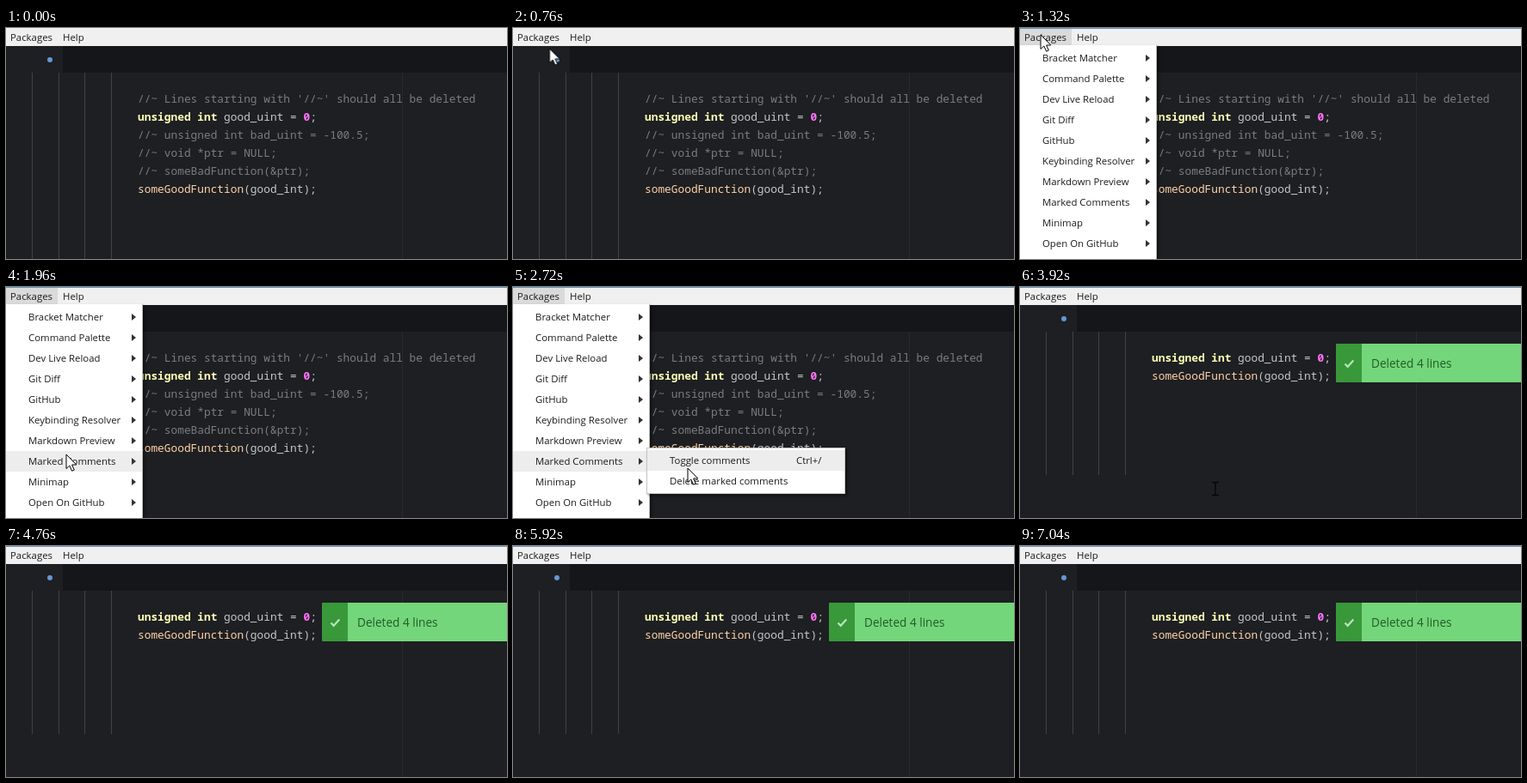
These frames come from a looping animation (582 px wide and 269 px high, 7.08 s). An HTML page:

```html
<!DOCTYPE html>
<html lang="en">
<head>
<meta charset="utf-8">
<title>Delete marked comments</title>
<style>
  :root { --loop: 7.08s; }
  html, body { margin: 0; width: 100%; height: 100%; overflow: hidden; background: #1d1f22; }
  #stage {
    position: relative; width: 582px; height: 269px; overflow: hidden;
    background: #1d1f22; color: #1c1c1c;
    font: 11.4px/24px "Open Sans", "Noto Sans", sans-serif;
  }
  #stage div, #stage svg, pre { position: absolute; }
  .bar, .menu, .note { white-space: nowrap; }

  /* window chrome */
  .bar { left: 0; top: 0; width: 582px; height: 21px; background: #f0f0f0; line-height: 20px; }
  .bar span { position: absolute; top: 1px; }
  .edge { left: 0; top: 0; width: 582px; height: 1px; background: #5d93b5; animation: edge var(--loop) step-end infinite; }
  .open { left: 0; top: 1px; width: 60px; height: 19px; background: #dadada; animation: open var(--loop) step-end infinite; }
  .tabs { left: 0; top: 20px; width: 582px; height: 32px; background: #151619; }
  .tab { left: 0; top: 0; width: 66px; height: 32px; background: #1d1f22; }
  .dot { left: 48px; top: 13.5px; width: 6px; height: 6px; border-radius: 50%; background: #6597d8; }

  /* editor */
  pre {
    margin: 0; left: 153px; top: 72px; color: #c5c8c6;
    font: 12.83px/21px "Noto Sans Mono", "Liberation Mono", monospace;
  }
  .c { color: #7c7c7c; }
  .k { color: #ffffb6; font-weight: 600; }
  .n { color: #ff73fd; font-weight: 600; }
  .f { color: #ffd2a7; }
  .guides {
    left: 30px; top: 52px; width: 93px; height: 251px;
    background:
      linear-gradient(#404244, #404244) 0 0 / 1px 100% no-repeat,
      linear-gradient(#404244, #404244) 31px 0 / 1px 100% no-repeat,
      linear-gradient(#404244, #404244) 61px 0 / 1px 100% no-repeat,
      linear-gradient(#404244, #404244) 92px 0 / 1px 100% no-repeat;
    animation: guides var(--loop) step-end infinite;
  }
  .wrap { left: 460px; top: 52px; width: 1px; height: 217px; background: #27292c; }
  .before { animation: before var(--loop) step-end infinite; }
  .after { animation: after var(--loop) step-end infinite; }

  /* menus */
  .menu { background: #fff; box-sizing: border-box; box-shadow: 2px 2px 3px rgba(0, 0, 0, .45); }
  .main { left: 0; top: 20px; width: 159px; height: 260px; border-right: 1px solid #bbb; animation: main var(--loop) step-end infinite; }
  .sub { left: 155px; top: 187px; width: 231px; height: 54px; border: 1px solid #c4c4c4; animation: sub var(--loop) step-end infinite; }
  .item { left: 0; width: 158px; height: 24px; text-indent: 26px; }
  .main .item::after {
    content: ""; position: absolute; left: 146px; top: 8px;
    border: 4px solid transparent; border-left: 5px solid #333; border-right: 0;
  }
  .hover { left: 0; height: 24px; background: #ededed; }
  .main .hover { top: 3px; width: 158px; animation: rows var(--loop) step-end infinite; }
  .sub .hover { top: 2px; width: 229px; animation: subrows var(--loop) step-end infinite; }

  /* notification */
  .note {
    left: 367px; top: 66px; width: 450px; height: 45px; border-radius: 2px; overflow: hidden;
    background: #74d67a; color: #1f5c27; font-size: 13.6px; line-height: 46px; text-indent: 41px;
    animation: note var(--loop) infinite;
  }
  .icon { left: 0; top: 0; width: 30px; height: 45px; background: #38983a; }

  /* pointer */
  .pointer { left: 0; top: 0; width: 0; height: 0; animation: path var(--loop) linear infinite; }
  .pointer svg { left: 0; top: 0; overflow: visible; width: 1px; height: 1px; }
  .arrow { animation: arrow var(--loop) step-end infinite; }
  .beam { animation: beam var(--loop) step-end infinite; }

  @keyframes edge { 0% { opacity: 0; } 12.43%, 100% { opacity: 1; } }
  @keyframes open { 0%, 50.85%, 100% { opacity: 0; } 12.43% { opacity: 1; } 47.46% { opacity: .7; } }
  @keyframes before { 0% { opacity: 1; } 47.46%, 100% { opacity: 0; } }
  @keyframes after { 0% { opacity: 0; } 47.46%, 100% { opacity: 1; } }
  @keyframes guides { 0% { height: 251px; } 47.46%, 100% { height: 167px; } }
  @keyframes main { 0%, 45.2%, 100% { opacity: 0; } 15.25% { opacity: 1; } }
  @keyframes sub { 0%, 45.2%, 100% { opacity: 0; } 34.46% { opacity: 1; } }
  @keyframes rows {
    0% { opacity: 0; transform: none; }
    22.4% { opacity: 1; transform: none; animation-timing-function: steps(7); }
    26.45%, 100% { opacity: 1; transform: translateY(168px); }
  }
  @keyframes subrows {
    0% { opacity: 0; transform: none; }
    37% { opacity: 1; transform: none; }
    39.83%, 100% { opacity: 1; transform: translateY(24px); }
  }
  @keyframes note {
    0%, 47.64% {
      opacity: 0; transform: perspective(450px) translate(0, -30px) rotateX(90deg);
      animation-timing-function: cubic-bezier(.175, .885, .32, 1.275);
    }
    49.9%, 100% { opacity: 1; transform: perspective(450px) translate(0, 0) rotateX(0deg); }
  }
  @keyframes path {
    0%, 3.39% { transform: translate(227px, 185px); animation-timing-function: ease-in-out; }
    12.71%, 22.03% { transform: translate(24px, 8px); }
    26.55%, 35.03% { transform: translate(70px, 195px); animation-timing-function: ease-in-out; }
    37.85%, 39.27% { transform: translate(203px, 211px); }
    41.81%, 45.2% { transform: translate(222px, 229px); }
    47.46%, 100% { transform: translate(227px, 235px); }
  }
  @keyframes arrow { 0%, 45.76%, 100% { opacity: 0; } 9.6% { opacity: 1; } }
  @keyframes beam { 0%, 9.6%, 56.5%, 100% { opacity: 0; } 1.13%, 45.76% { opacity: 1; } }
</style>
</head>
<body>
<div id="stage">
  <div class="tabs"><div class="tab"></div><div class="dot"></div></div>
  <div class="guides"></div>
  <div class="wrap"></div>

<pre class="before"><span class="c">//~ Lines starting with '//~' should all be deleted</span>
<span class="k">unsigned int</span> good_uint = <span class="n">0</span>;
<span class="c">//~ unsigned int bad_uint = -100.5;
//~ void *ptr = NULL;
//~ someBadFunction(&amp;ptr);</span>
<span class="f">someGoodFunction</span>(good_int);</pre>
<pre class="after"><span class="k">unsigned int</span> good_uint = <span class="n">0</span>;
<span class="f">someGoodFunction</span>(good_int);</pre>

  <div class="note">Deleted 4 lines
    <div class="icon">
      <svg width="30" height="45" style="left:0;top:0"><path d="M10.5 23.5l3.2 3.3 6.6-7.3" fill="none" stroke="#b4e6b6" stroke-width="2.2"/></svg>
    </div>
  </div>

  <div class="bar">
    <div class="edge"></div>
    <div class="open"></div>
    <span style="left:5px">Packages</span><span style="left:66px">Help</span>
  </div>

  <div class="menu main"><div class="hover"></div></div>
  <div class="menu sub">
    <div class="hover"></div>
    <div class="item" style="top:2px">Toggle comments</div>
    <div class="item" style="top:2px;left:147px">Ctrl+/</div>
    <div class="item" style="top:26px">Delete marked comments</div>
  </div>

  <div class="pointer">
    <svg class="arrow"><path d="M0 0V16.5L3.8 13 6.6 19.2 9.3 18 6.6 12H11.8Z" fill="#fff" stroke="#000" stroke-linejoin="round"/></svg>
    <svg class="beam"><path d="M-4 -7.5H-1L0 -6.5 1 -7.5H4M0 -6.5V6.5M-4 7.5H-1L0 6.5 1 7.5H4" fill="none" stroke="#050505" stroke-width="1.3"/></svg>
  </div>
</div>
<script>
  const main = document.querySelector('.main');
  const labels = ['Bracket Matcher', 'Command Palette', 'Dev Live Reload', 'Git Diff', 'GitHub',
    'Keybinding Resolver', 'Markdown Preview', 'Marked Comments', 'Minimap', 'Open On GitHub'];
  labels.forEach((label, i) => {
    const item = document.createElement('div');
    item.className = 'item';
    item.textContent = label;
    item.style.top = 3 + 24 * i + 'px';
    main.append(item);
  });
</script>
</body>
</html>
```
